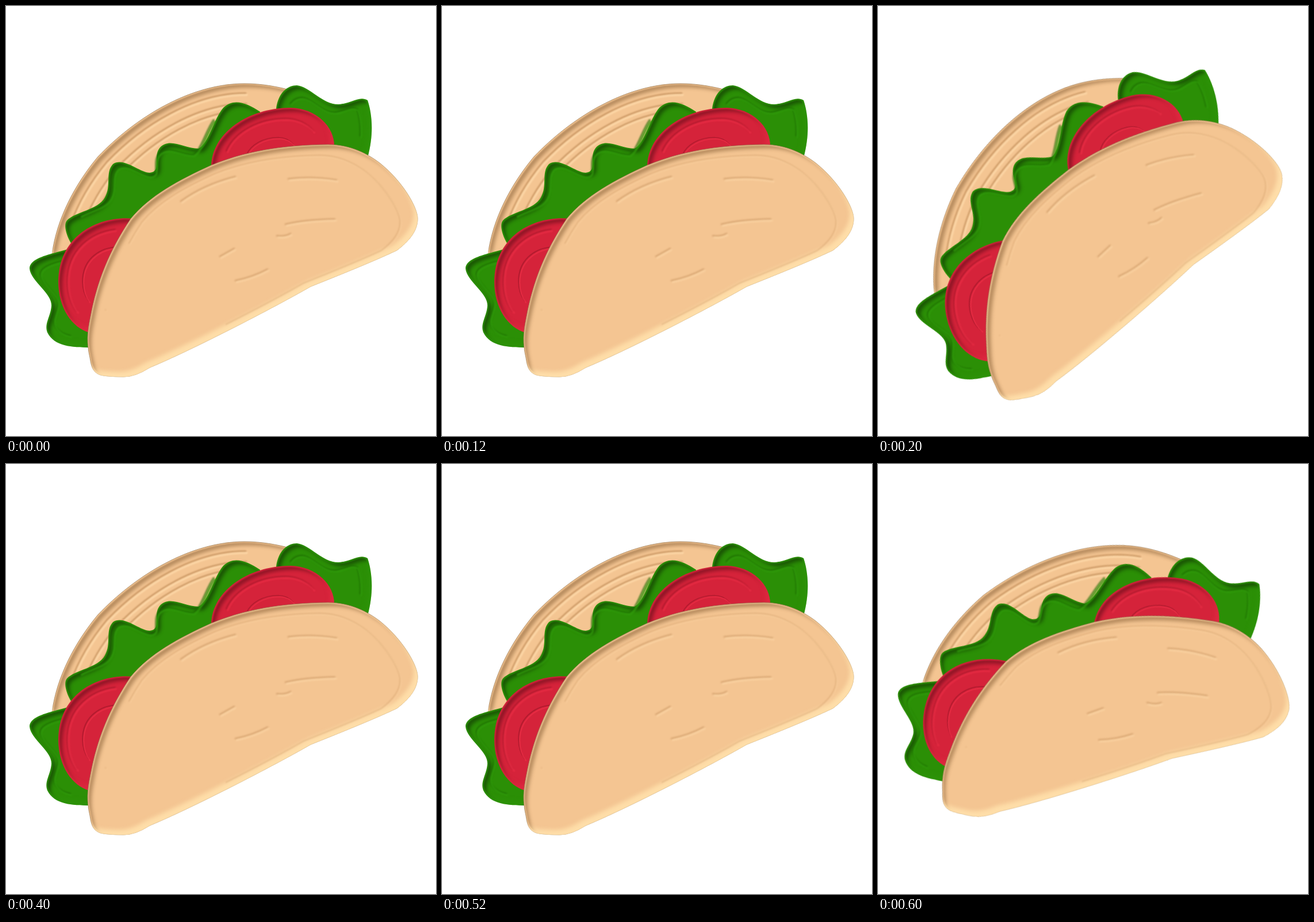
Animation of 748x748 px, one loop 0.8 s. Source, as an HTML page:

```html
<!DOCTYPE html>
<html lang="en">
<head>
<meta charset="utf-8">
<title>Taco</title>
<style>
  html, body { margin: 0; width: 100%; height: 100%; overflow: hidden; background: #fff; }
  svg { display: block; width: 100%; height: 100%; }
  #taco { transform-origin: 378.5px 390.5px; animation: rock 800ms step-end infinite; }
  @keyframes rock {
    0%, 50%, 100% { transform: rotate(0deg); }
    25% { transform: rotate(-13.6deg); }
    75% { transform: rotate(9.6deg); }
  }
  .shell { --low: #b98450; --high: #ffdbab; }
  .leaf { --low: #1c6a02; --high: #2f990a; }
  .tomato { --low: #9f1628; --high: #ea2d45; }
  .shell .body { fill: #f4c592; stroke: #9c7c56; stroke-width: .8; }
  .leaf .body { fill: #2b8f06; }
  .tomato .body { fill: #d5233a; }
  .crease { fill: none; stroke-width: 4; stroke-linecap: round; filter: url(#soft); }
  .low { stroke: var(--low); opacity: .6; }
  .high { stroke: var(--high); opacity: .8; }
  .ring { stroke-dasharray: 0 10 76 100; }
  .thin .crease { stroke-width: 2.4; }
  .faint .ring { opacity: .25; }
</style>
</head>
<body>
<svg viewBox="0 0 748 748">
  <defs id="defs">
    <filter id="soft" filterUnits="userSpaceOnUse" x="0" y="0" width="748" height="748"
            color-interpolation-filters="sRGB">
      <feGaussianBlur stdDeviation="1.4"/>
    </filter>
  </defs>
  <g id="taco"></g>
</svg>
<script>
  // Each part: visible edge, the rest of its outline, and inset creases around a centre
  const parts = [
    { kind: 'shell', at: [440, 440], rings: [.94, .88, .84],
      edge: 'M80 432C88 370 120 310 160 262C225 194 320 135 415 135C445 135 470 140 494 146',
      rest: 'L520 240 200 400 110 440Z' },
    { kind: 'leaf', at: [260, 350], rings: [.88],
      edge: 'M114 414C104 398 100 380 106 373C120 358 160 355 172 333C184 312 172 290 186 275' +
            'C205 262 232 290 250 290C272 288 254 262 268 246C285 228 310 248 335 248' +
            'C352 240 362 195 378 177C396 160 418 168 442 184',
      rest: 'L440 260 300 330 170 450 130 430Z' },
    { kind: 'leaf', at: [550, 240], rings: [.78],
      edge: 'M470 178C474 150 490 138 506 138C528 140 550 171 578 171C600 170 615 155 629 164' +
            'C636 185 641 220 629 264',
      rest: 'L560 300 480 260Z' },
    { kind: 'leaf', at: [140, 510], rings: [.8],
      edge: 'M113 421C90 430 41 435 41 457C43 478 80 500 79 521C78 540 66 552 72 568' +
            'C84 592 115 594 146 594',
      rest: 'L200 590 200 450Z' },
    { kind: 'tomato', at: [185, 480], rings: [.82, .54],
      edge: 'M222 370C160 364 91 400 91 480C91 525 115 560 145 568',
      rest: 'L200 560 260 400Z' },
    { kind: 'tomato', at: [460, 268], rings: [.78, .42],
      edge: 'M357 278C358 222 420 177 495 177C540 178 571 210 571 244',
      rest: 'L560 290 360 320Z' },
    { kind: 'shell thin faint', at: [420, 440], rings: [.9],
      edge: 'M147 540C158 480 180 425 217 370C250 330 300 303 357 277C415 253 480 242 560 241' +
            'C600 241 630 258 650 273C690 305 716 350 716 370C716 392 700 410 680 425' +
            'C640 444 575 470 530 488C460 528 320 600 250 629Q225 645 205 645',
      rest: 'C190 645 168 644 162 641C150 636 148 625 146 612C140 585 141 570 147 540Z',
      marks: 'M305 341Q345 312 400 298M492 302Q532 297 576 304M373 437L398 423' +
             'M400 479Q430 473 456 459M472 401Q486 403 496 397M487 381Q520 373 573 372' }
  ];

  // Raised edge: shaded toward the upper left, lit toward the lower right
  const bevel = (id, dark, light, glow) => `
    <filter id="${id}" x="-5%" y="-5%" width="110%" height="110%" color-interpolation-filters="sRGB">
      <feMorphology in="SourceAlpha" operator="erode" radius="2"/>
      <feGaussianBlur stdDeviation="1" result="core"/>
      <feOffset in="SourceAlpha" dx="7" dy="7"/>
      <feGaussianBlur stdDeviation="3" result="a"/>
      <feFlood flood-color="${dark}" flood-opacity=".4"/>
      <feComposite in2="a" operator="out"/>
      <feComposite in2="core" operator="in" result="shade"/>
      <feOffset in="SourceAlpha" dx="-7" dy="-9"/>
      <feGaussianBlur stdDeviation="3.5" result="b"/>
      <feFlood flood-color="${light}" flood-opacity="${glow}"/>
      <feComposite in2="b" operator="out"/>
      <feComposite in2="SourceAlpha" operator="in" result="lit"/>
      <feMerge>
        <feMergeNode in="SourceGraphic"/><feMergeNode in="lit"/><feMergeNode in="shade"/>
      </feMerge>
    </filter>`;

  const crease = (d, kind, [x, y], scale = 1) => [['low', -1], ['high', 1]].map(([tone, shift]) =>
    `<path class="crease ${tone} ${kind}" d="${d}" pathLength="100"
      transform="translate(${x + shift} ${y + shift * 1.3}) scale(${scale}) translate(${-x} ${-y})"/>`).join('');

  const draw = ({ kind, at, rings, edge, rest, marks }) => `
    <g class="${kind}">
      <path class="body" d="${edge + rest}" filter="url(#${kind.split(' ')[0]})"/>
      ${rings.map(s => crease(edge, 'ring', at, s)).join('')}
      ${marks ? crease(marks, '', at) : ''}
    </g>`;

  document.getElementById('defs').innerHTML +=
    bevel('shell', '#5a3410', '#ffe0ab', .9) +
    bevel('leaf', '#000', '#2f990a', .3) +
    bevel('tomato', '#2a0008', '#ea2d45', .5);
  document.getElementById('taco').innerHTML = parts.map(draw).join('');
</script>
</body>
</html>
```
